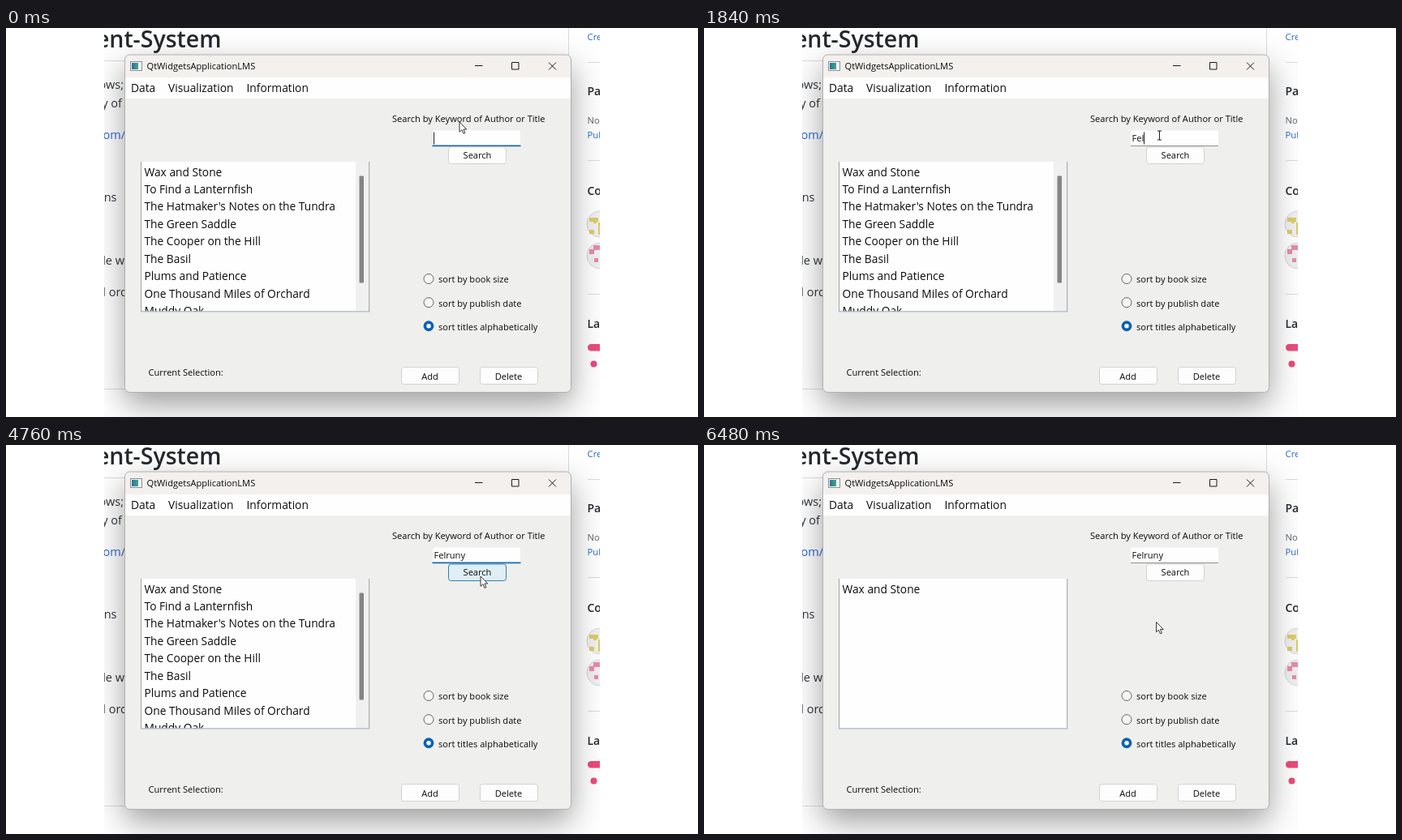
Recreate the animation shown at these times as an HTML page. Size 853 by 480 pixels, loop 8 s.

```html
<!DOCTYPE html>
<html lang="en">
<head>
<meta charset="utf-8">
<title>Library search</title>
<style>
  html, body { margin: 0; width: 100%; height: 100%; overflow: hidden; background: #fff; }
  svg { display: block; width: 853px; height: 480px; }
  text { font: 11.1px "Open Sans", "Noto Sans", sans-serif; fill: #0c0c0c; white-space: pre; }
  .big, .list text { font-size: 13.75px; }
  .page text { font-size: 14.5px; fill: #30353a; }
  .page .side { font-size: 11.3px; fill: #5c646c; }
  .page .head { font-size: 14px; font-weight: 600; fill: #24292f; }
  .page .h1 { font-size: 28.5px; font-weight: 600; fill: #24292f; }
  .page .link { fill: #2a68cc; }
  .rule { stroke: #d8dbdf; }
  .frame { fill: #efefed; filter: drop-shadow(0 15px 19px rgba(0, 0, 0, .38)); }
  .glyph { fill: none; stroke: #1a1a1a; }
  .btn rect { fill: #fdfdfd; stroke: #d2d2d1; }
  .btn text { text-anchor: middle; }
  .btn.hover rect { fill: #e0eef5; stroke: #2f82ae; }
  .btn.down rect { fill: #d3e7f2; stroke: #2f82ae; }
  .radio { fill: #f6f6f6; stroke: #666; }
  .radio.on { fill: #fff; stroke: #0a62b5; stroke-width: 3.7; }
</style>
</head>
<body>
<svg viewBox="0 0 853 480">
  <defs>
    <clipPath id="pageClip"><rect x="121" width="611" height="480"/></clipPath>
    <clipPath id="listClip"><rect x="167" y="165" width="281" height="184.500"/></clipPath>
    <clipPath id="winClip"><rect x="146.5" y="33" width="550" height="416.5" rx="6"/></clipPath>
    <linearGradient id="icon"><stop offset="0" stop-color="#2b6f9e"/><stop offset="1" stop-color="#3fa98a"/></linearGradient>
  </defs>

  <g clip-path="url(#pageClip)">
    <g class="page">
      <rect x="121" width="611" height="480" fill="#fefefe"/>
      <path class="rule" d="M121 40.5H693M121 445.5H693M693.5 0V60M717 42.5H732M717 163.5H732M717 328.5H732"/>
      <text class="h1" x="265.500" y="24" text-anchor="end">ent-System</text>
      <g text-anchor="end">
        <text x="145" y="75">ows;</text>
        <text x="143" y="98">y of</text>
        <text class="link" x="147" y="137">om/</text>
        <text x="136.5" y="214">ns</text>
        <text x="146" y="291.500">le w</text>
        <text x="148" y="331">d orc</text>
      </g>
      <text class="side link" x="716.500" y="15">Create</text>
      <text class="head" x="716.500" y="83">Packages</text>
      <text class="side" x="716.500" y="118">No packages</text>
      <text class="side link" x="716.500" y="136">Publish</text>
      <text class="head" x="716.500" y="206">Contributors</text>
      <text class="head" x="716.500" y="370">Languages</text>
      <g fill="#efefef" stroke="#d4d4d4"><circle cx="732" cy="242" r="16"/><circle cx="732" cy="281" r="16"/></g>
      <path fill="#dccb68" d="M719 234h11v5h-11zM730 240h2v15h-2zM719 249h6v5h-6zM724 239h4v2h-4z"/>
      <path fill="#e58bab" d="M724 268h8v6h-8zM719 273h6v6h-6zM725 284h5v5h-5z"/>
      <rect x="717" y="390" width="30" height="8.500" rx="4.200" fill="#ec4a7b"/>
      <circle cx="724.500" cy="414.500" r="4" fill="#ec4a7b"/>
    </g>
    <rect class="frame" x="146.500" y="33" width="550" height="416.500" rx="6"/>
  </g>

  <g clip-path="url(#winClip)">
    <rect x="146" y="33" width="551" height="28.500" fill="#f4f0ee"/>
    <rect x="146" y="61" width="551" height="26" fill="#fefefe"/>
  </g>
  <rect class="glyph" x="146.500" y="33" width="550" height="416.500" rx="6" style="stroke:#b0b0b0"/>
  <rect x="153.500" y="41.500" width="14" height="11" fill="#f4f4f4" stroke="#8b9196"/>
  <rect x="155" y="43" width="8" height="8" fill="url(#icon)"/>
  <text x="173.500" y="51">QtWidgetsApplicationLMS</text>
  <path class="glyph" d="M578 46.500H587.500M623.500 42.500h8.500v8.500h-8.500zM669 42.500l9 9M678 42.500l-9 9"/>
  <text class="big" x="154" y="79">Data</text>
  <text class="big" x="200" y="79">Visualization</text>
  <text class="big" x="296.500" y="79">Information</text>

  <text x="476" y="116">Search by Keyword of Author or Title</text>
  <rect x="526" y="126.500" width="108" height="19.500" rx="1.500" fill="#fefefe"/>
  <path id="underline"/>
  <text id="query" x="527.500" y="140"></text>
  <path id="caret" stroke="#222" d="M0 128.500V143.500"/>

  <g class="list" clip-path="url(#listClip)">
    <rect x="166" y="165" width="282" height="185" fill="#fefefe"/>
    <g id="items"></g>
    <g id="bar">
      <rect x="431" y="165" width="17" height="185" fill="#f0f0f0"/>
      <rect x="435.500" y="182.500" width="5.500" height="132" rx="1" fill="#858585"/>
    </g>
  </g>
  <path class="glyph" d="M166.500 165V350M447.700 165V350" style="stroke:#a0a3a6"/>
  <path class="glyph" d="M166 349.900H448.200" style="stroke:#94aabd"/>

  <circle class="radio" cx="521" cy="309.500" r="6"/>
  <circle class="radio" cx="521" cy="338.700" r="6"/>
  <circle class="radio on" cx="521" cy="367.700" r="4.600"/>
  <text x="533" y="314">sort by book size</text>
  <text x="533" y="343.500">sort by publish date</text>
  <text x="533" y="372.500">sort titles alphabetically</text>
  <text x="175.500" y="429">Current Selection:</text>

  <g class="btn" id="search"><rect x="545.500" y="147" width="71" height="20.500" rx="3"/><text x="581" y="161.300">Search</text></g>
  <g class="btn"><rect x="487.500" y="418.500" width="71" height="21" rx="3"/><text x="522.500" y="433.500">Add</text></g>
  <g class="btn"><rect x="584.500" y="418.500" width="71" height="21" rx="3"/><text x="619.500" y="433.500">Delete</text></g>

  <path id="arrow" d="M0 0V12.300L2.900 9.700L5 14.400L6.900 13.500L4.900 9H8.700Z" fill="#fff" stroke="#222" stroke-width=".9"/>
  <path id="beam" class="glyph" d="M-2.500 -5.500H2.500M-2.500 5.500H2.500M0 -5.500V5.500"/>
</svg>
<script>
  const LOOP = 8000, WORD = "Felruny";
  const KEYS = [1330, 1590, 1840, 1970, 2220, 2600, 2720];
  const PRESS = 5010, RELEASE = 5140, FILTER = 5200;
  const BLINK = [[0, 260], [800, 3240], [3780, 4310], [4830, PRESS]];
  // time, x, y of the pointer
  const PATH = [
    [0, 559, 116], [260, 559, 116], [600, 561, 132], [4190, 561, 132],
    [4700, 585, 162], [5900, 585, 162], [6030, 578, 178],
    [6290, 566, 207], [6480, 557.5, 218.5], [LOOP, 557.5, 218.5]
  ];
  const TITLES = [
    "Wax and Stone", "To Find a Lanternfish", "The Hatmaker's Notes on the Tundra",
    "The Green Saddle", "The Cooper on the Hill", "The Basil", "Plums and Patience",
    "One Thousand Miles of Orchard", "Muddy Oak"
  ];

  const $ = id => document.getElementById(id);
  const show = (el, on) => { el.style.display = on ? "" : "none"; };
  const move = (el, x, y) => el.setAttribute("transform", `translate(${x} ${y})`);

  const rows = TITLES.map((title, i) => {
    const row = document.createElementNS("http://www.w3.org/2000/svg", "text");
    row.setAttribute("x", 170.5);
    row.setAttribute("y", 182.5 + i * 21.45);
    row.textContent = title;
    return $("items").appendChild(row);
  });

  function pointer(t) {
    const i = PATH.findIndex(p => p[0] > t);
    const [t0, x0, y0] = PATH[i - 1], [t1, x1, y1] = PATH[i];
    const k = (t - t0) / (t1 - t0);
    return [x0 + (x1 - x0) * k, y0 + (y1 - y0) * k];
  }

  function draw(t) {
    const [x, y] = pointer(t);
    const overEdit = x > 526 && x < 634 && y > 126 && y < 146;
    const overButton = x > 545 && x < 617 && y >= 147 && y < 168;

    show($("beam"), overEdit);
    show($("arrow"), !overEdit);
    move($("beam"), x + .5, y + .5);
    move($("arrow"), x, y);

    const active = t < PRESS && !overEdit;
    const line = $("underline");
    line.setAttribute("d", active ? "M525.500 145.300H634.500" : "M526 145.500H634");
    line.setAttribute("stroke", active ? "#1769b4" : "#8d9194");
    line.setAttribute("stroke-width", active ? 1.7 : 1);

    const query = $("query");
    const typed = WORD.slice(0, KEYS.filter(k => t >= k).length);
    if (query.textContent !== typed) query.textContent = typed;
    const end = typed ? query.getComputedTextLength() : 0;
    move($("caret"), Math.floor(527.5 + end) + .5, 0);
    show($("caret"), BLINK.some(([a, b]) => t >= a && t < b));

    const down = t >= PRESS && t < RELEASE;
    $("search").setAttribute("class", "btn" + (down ? " down" : overButton ? " hover" : ""));
    rows.forEach((row, i) => show(row, !i || t < FILTER));
    show($("bar"), t < FILTER);
  }

  const start = performance.now();
  function tick() {
    draw((performance.now() - start) % LOOP);
    requestAnimationFrame(tick);
  }
  tick();
</script>
</body>
</html>
```
